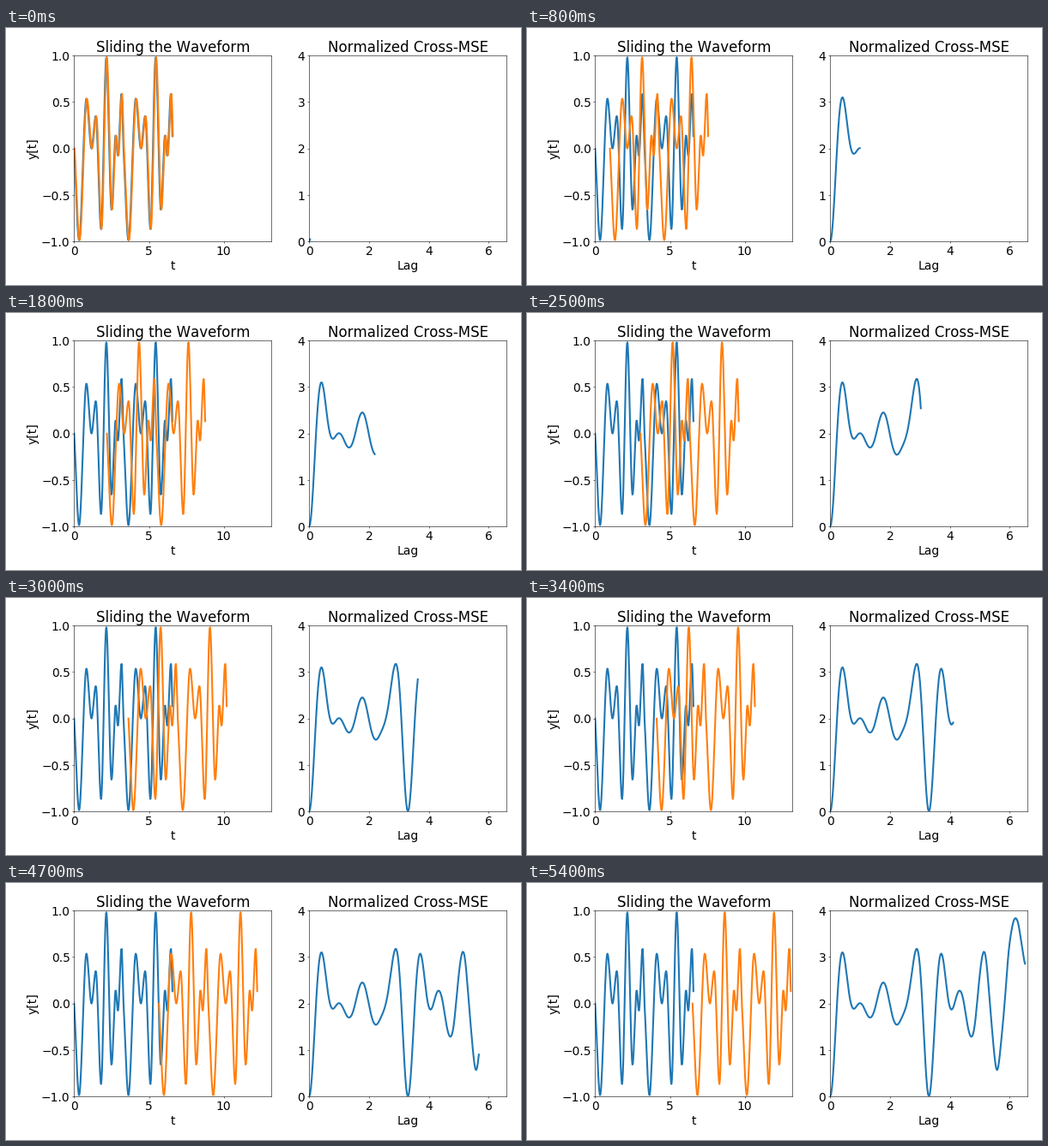
Write a matplotlib script that moves like this. It is 600x300 px and loops after 5.5 s.

```python
import numpy as np
import matplotlib.pyplot as plt
from matplotlib.animation import FuncAnimation

W, H = 600, 300
FRAMES, INTERVAL = 55, 100
DT = 0.03        # sample spacing
STEP = 4         # samples moved per frame
PERIOD = 3.3
SPAN = 2 * PERIOD

plt.rcParams.update({
    "font.family": "DejaVu Sans",
    "font.size": 20,
    "text.kerning_factor": 6,
    "lines.linewidth": 3,
})

# Peaks and troughs of one period, which starts and ends on a falling zero
TURNS = [(0.33, -0.985), (0.82, 0.538), (1.16, 0.0), (1.45, 0.35),
         (1.80, -0.865), (2.15, 0.985), (2.50, -0.66), (2.775, 0.145),
         (2.925, -0.08), (3.17, 0.595)]
SEAM_SLOPE = -3


def waveform(t):
    """Cubic easing from turn to turn, repeated every period."""
    x, y = np.array([(0, 0), *TURNS, (PERIOD, 0)]).T
    slope = np.zeros_like(x)
    slope[[0, -1]] = SEAM_SLOPE
    t = t % PERIOD
    i = np.searchsorted(x, t, side="right") - 1
    h = x[i + 1] - x[i]
    u = (t - x[i]) / h
    ease = u * u * (3 - 2 * u)
    bend = h * u * (1 - u) * (slope[i] * (1 - u) - slope[i + 1] * u)
    return y[i] + (y[i + 1] - y[i]) * ease + bend


def cross_error(y, lag):
    """Squared distance between the two overlapping parts at unit length."""
    a, b = y[:len(y) - lag], y[lag:]
    return np.sum((a / np.linalg.norm(a) - b / np.linalg.norm(b)) ** 2)


t = np.arange(round(SPAN / DT)) * DT
y = waveform(t)
error = np.array([cross_error(y, lag) for lag in range(len(y) - 2)])

fig = plt.figure(figsize=(W / 50, H / 50), dpi=50, facecolor="white")


def panel(left, right, title, xlabel, xlim, ylim, xticks, yticks):
    ax = fig.add_axes([left / W, 50.7 / H, (right - left) / W, 217.1 / H])
    ax.set(title=title, xlabel=xlabel, xlim=xlim, ylim=ylim,
           xticks=xticks, yticks=yticks)
    return ax


wave_ax = panel(79.4, 309.4, "Sliding the Waveform", "t", (0, 2 * SPAN),
                (-1, 1), np.arange(0, 11, 5), np.linspace(-1, 1, 5))
wave_ax.set_ylabel("y[t]")
error_ax = panel(353.2, 583.3, "Normalized Cross-MSE", "Lag", (0, SPAN),
                 (0, 4), np.arange(0, 7, 2), np.arange(5))

wave_ax.plot(t, y, color="C0")
slider, = wave_ax.plot(t, y, color="C1")
trace, = error_ax.plot([], [], color="C0")


def update(frame):
    lag = frame * STEP + 1
    slider.set_xdata(t + lag * DT)
    trace.set_data(t[:lag + 1], error[:lag + 1])
    return slider, trace


anim = FuncAnimation(fig, update, frames=FRAMES, interval=INTERVAL,
                     repeat=True, repeat_delay=0)
plt.show()
```
